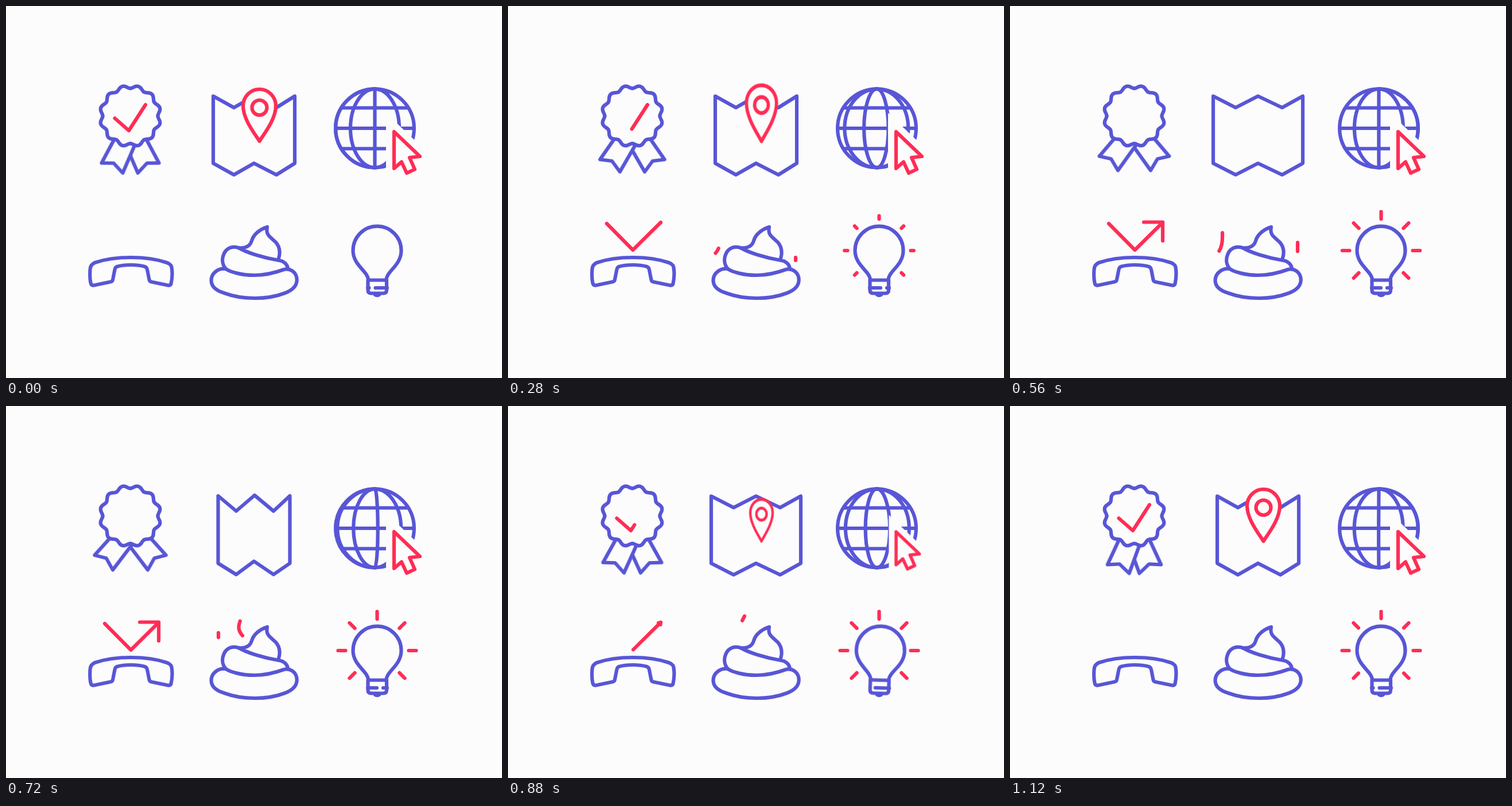
Write an HTML page without scripts that moves like this. It is 864x648 px and loops after 1.16 s.

```html
<!DOCTYPE html>
<html lang="en">
<head>
<meta charset="utf-8">
<title>Icon set</title>
<style>
  :root { --bg: #fcfcfc; --blue: #5856d6; --red: #ff2d55; --loop: 1160ms; }
  html, body { margin: 0; width: 100%; height: 100%; overflow: hidden; background: var(--bg); }
  svg { display: block; width: 100%; height: 100%; }
  svg { fill: none; stroke: var(--blue); stroke-width: 6.2; stroke-linecap: round; stroke-linejoin: round; }
  .red { stroke: var(--red); }
  .solid { fill: var(--bg); }
  .flat { stroke-linecap: butt; }
  .gap { fill: var(--bg); stroke: var(--bg); stroke-width: 28; stroke-linejoin: miter; stroke-miterlimit: 4; }

  /* Trimmed lines: one dash of the full length travels along the path */
  .trim { stroke-dasharray: 100 110; animation: var(--loop) linear infinite; }

  .ribbon { transform-origin: 216.5px 217px; animation: sway var(--loop) ease-in-out infinite; }
  @keyframes sway {
    0%, 96.55%, 100% { transform: rotate(0deg); }
    24.14% { transform: rotate(8deg); animation-timing-function: ease-out; }
    37.93% { transform: rotate(14.5deg); animation-timing-function: ease-in; }
    48.28% { transform: rotate(8deg); animation-timing-function: ease-out; }
    62.07% { transform: rotate(-4.6deg); }
    75.86% { transform: rotate(5.6deg); }
  }

  .check { animation-name: check; }
  @keyframes check {
    0%, 3% { stroke-dashoffset: 0; animation-timing-function: ease-in; }
    24.14% { stroke-dashoffset: -41; animation-timing-function: ease-out; }
    37.93% { stroke-dashoffset: -98.5; }
    39.6%, 64% { stroke-dashoffset: -105; }
    75.86% { stroke-dashoffset: -161; animation-timing-function: ease-out; }
    89.66%, 100% { stroke-dashoffset: -210; }
  }

  .map { animation: fold var(--loop) ease-in-out infinite; }
  @keyframes fold {
    0%, 37.93%, 96.55%, 100% { d: path("M361 157L397 177L432 157L471 177L503 157L503 274L471 294L432 274L397 294L361 274Z"); }
    48.28%, 75.86% { d: path("M354 157L393 177L432 157L474 177L510 157L510 274L474 294L432 274L393 294L354 274Z"); }
    62.07% { d: path("M369.5 156.5L401 183L433 155.5L466 183L494.5 156.5L494.5 274L466 293.5L432 270.5L401 293.5L369.5 274Z"); }
  }

  .pin { transform-origin: 441.5px 235px; animation: pop var(--loop) ease-in-out infinite; }
  @keyframes pop {
    0%, 6.9%, 96.55%, 100% { transform: scale(1, 1); }
    24.14% { transform: scale(.92, 1.078); animation-timing-function: ease-in; }
    35.5%, 62.07% { transform: scale(0, 0); animation-timing-function: ease-in; }
    75.86% { transform: scale(.68, .8); animation-timing-function: ease-out; }
    84.5% { transform: scale(.92, 1.078); }
  }

  /* Four meridians share one path of travel, one slot apart */
  .turn path { animation: turn 2320ms ease-in-out infinite; }
  .turn path:nth-child(2) { animation-delay: -580ms; }
  .turn path:nth-child(3) { animation-delay: -1160ms; }
  .turn path:nth-child(4) { animation-delay: -1740ms; }
  @keyframes turn {
    0% { d: path("M0 -68.4C-37.8 -68.4 -68.4 -37.8 -68.4 0C-68.4 37.8 -37.8 68.4 0 68.4"); }
    25% { d: path("M0 -68.4C-23.4 -68.4 -42.5 -37.8 -42.5 0C-42.5 37.8 -23.4 68.4 0 68.4"); }
    50% { d: path("M0 -68.4C0 -68.4 0 -37.8 0 0C0 37.8 0 68.4 0 68.4"); }
    75% { d: path("M0 -68.4C23.4 -68.4 42.5 -37.8 42.5 0C42.5 37.8 23.4 68.4 0 68.4"); }
    100% { d: path("M0 -68.4C37.8 -68.4 68.4 -37.8 68.4 0C68.4 37.8 37.8 68.4 0 68.4"); }
  }

  .cursor { transform-origin: 676px 219px; animation: click var(--loop) ease-in-out infinite; }
  @keyframes click {
    0%, 66%, 93%, 100% { transform: scale(1); }
    75.86%, 81% { transform: scale(.9); }
  }

  .shaft { animation-name: shaft; }
  @keyframes shaft {
    0% { stroke-dashoffset: 105; }
    3% { stroke-dashoffset: 101; animation-timing-function: ease-in-out; }
    23.5%, 63.8% { stroke-dashoffset: 0; animation-timing-function: ease-in; }
    75.86% { stroke-dashoffset: -48.7; animation-timing-function: ease-out; }
    87.9% { stroke-dashoffset: -101; }
    89%, 100% { stroke-dashoffset: -105; }
  }
  .head { animation: head var(--loop) ease-in-out infinite, blink var(--loop) step-end infinite; }
  @keyframes head {
    0%, 24.14%, 78%, 100% { d: path("M266 377L266 377L266 377"); }
    37.93% { d: path("M235 374L266.5 376L271 407"); }
    48.28%, 62.07% { d: path("M233 376.5L266 376.5L266 409"); }
    75.86% { d: path("M262 378L266 377L265.5 381"); }
  }
  @keyframes blink { 0%, 85% { opacity: 0; } 24.2% { opacity: 1; } }

  .steam1 { animation-name: steam1; }
  @keyframes steam1 {
    0%, 18% { stroke-dashoffset: 105; }
    24.14% { stroke-dashoffset: 74; }
    37.93% { stroke-dashoffset: 22; }
    48.28% { stroke-dashoffset: -12; }
    62.07% { stroke-dashoffset: -78; }
    67%, 100% { stroke-dashoffset: -105; }
  }
  .steam2 { animation-name: steam2; }
  @keyframes steam2 {
    0%, 20.7% { stroke-dashoffset: 105; }
    24.14% { stroke-dashoffset: 85; }
    37.93% { stroke-dashoffset: 10; }
    48.28% { stroke-dashoffset: -50; }
    57%, 100% { stroke-dashoffset: -105; }
  }
  .steam3 { animation-name: steam3; }
  @keyframes steam3 {
    0%, 50% { stroke-dashoffset: 105; }
    62.07% { stroke-dashoffset: 27; }
    75.86% { stroke-dashoffset: -76; }
    80%, 100% { stroke-dashoffset: -105; }
  }

  .bulb { transform-origin: 647px 500px; animation: wobble var(--loop) ease-in-out infinite; }
  @keyframes wobble {
    0%, 67%, 96.55%, 100% { transform: rotate(0deg); }
    75.86% { transform: rotate(1.8deg); }
    84.5% { transform: rotate(-1.2deg); }
  }
  .thread { stroke-dasharray: 40 11; animation: screw var(--loop) ease-in-out infinite; }
  @keyframes screw {
    0%, 96.55%, 100% { stroke-dashoffset: 37.5; }
    24.14% { stroke-dashoffset: 21; }
    37.93% { stroke-dashoffset: 22.5; }
    48.28%, 62.07% { stroke-dashoffset: 24; }
    75.86% { stroke-dashoffset: 41.5; }
  }
  .ray { animation-name: ray; }
  @keyframes ray {
    0%, 12% { stroke-dashoffset: 105; }
    24.14% { stroke-dashoffset: 22; animation-timing-function: ease-out; }
    34.5%, 63.8% { stroke-dashoffset: 0; animation-timing-function: ease-in-out; }
    75.86% { stroke-dashoffset: -98; }
    77.6%, 100% { stroke-dashoffset: -105; }
  }
</style>
</head>
<body>
<svg viewBox="0 0 864 648" xmlns="http://www.w3.org/2000/svg">
  <defs>
    <path id="bump" d="M-12.42 -46.36C-7.4 -47.7 -6.4 -53.4 0 -53.4S7.4 -47.7 12.42 -46.36"/>
    <path id="ribbon" class="ribbon solid" d="M190 230L167 274L188 274L204 291L228 234"/>
    <path id="ray" class="ray trim red" pathLength="100" d="M0 -55V-68"/>
    <path id="arrow" d="M676 219V283L689 271.5L698 291L712 284.5L703 264L721 262Z"/>
  </defs>

  <!-- Award -->
  <g transform="translate(433 0) scale(-1 1)"><use href="#ribbon"/></g>
  <use href="#ribbon"/>
  <g class="solid" transform="translate(216.5 191.5)">
    <circle r="48" stroke="none"/>
    <use href="#bump" transform="rotate(15)"/>
    <use href="#bump" transform="rotate(45)"/>
    <use href="#bump" transform="rotate(75)"/>
    <use href="#bump" transform="rotate(105)"/>
    <use href="#bump" transform="rotate(135)"/>
    <use href="#bump" transform="rotate(165)"/>
    <use href="#bump" transform="rotate(195)"/>
    <use href="#bump" transform="rotate(225)"/>
    <use href="#bump" transform="rotate(255)"/>
    <use href="#bump" transform="rotate(285)"/>
    <use href="#bump" transform="rotate(315)"/>
    <use href="#bump" transform="rotate(345)"/>
  </g>
  <path class="check trim red" pathLength="100" d="M189.5 195.5L214 217L243 172"/>

  <!-- Map -->
  <path class="map" d="M361 157L397 177L432 157L471 177L503 157L503 274L471 294L432 274L397 294L361 274Z"/>
  <g class="pin red solid">
    <path d="M441.5 235.5C433 222 413 197 413 174A28.5 29 0 0 1 470 174C470 197 450 222 441.5 235.5Z"/>
    <circle cx="441.5" cy="177" r="13"/>
  </g>

  <!-- Globe -->
  <g transform="translate(642.5 213)">
    <path class="flat" d="M-58.5 -35.5H58.5M-68.4 0H68.4M-58.5 35.5H58.5"/>
    <g class="turn"><path/><path/><path/><path/></g>
    <circle r="68.4"/>
  </g>
  <g class="cursor">
    <use href="#arrow" class="gap"/>
    <use href="#arrow" class="red"/>
  </g>

  <!-- Phone -->
  <path d="M146.5 459C147 452 150 449 155 447C190 435 245 435 280 447C286 449 289 452 289 459C290 467 289 477 287.500 484C286.500 486 285 487 282 486.500L253 480.500C251 480 250 479 249.500 477L246 459C245.500 456 244 455 242 454C228 450 207 450 193 454C191 455 190 456 189.500 459L186 477C185.500 479 184 480 182 480.500L153.500 486.500C150.500 487 149 486 148 484C146 477 146 467 146.500 459Z"/>
  <path class="shaft trim red" pathLength="100" d="M172 379L217.500 425L266 377"/>
  <path class="head red" d="M266 377L266 377L266 377"/>

  <!-- Swirl -->
  <path d="M383 458C369 456 357.500 466 357.500 478C357.500 489 367 496 380 500C412 512 455 512 486 500C499 495 506.700 488 506.700 477C506.700 464 495 456 484 459C476 462 456 469 432 469C410 469 390 463 383 458"/>
  <path d="M383 458C376 450 376 440 379.500 432C384 421 395 417.500 406 421.500C418 429 446 438 475 443C484 444 490 450 491 457"/>
  <path d="M406 421.500C420 422 426 416 428 409C431 398 442 389 455 385C452 398 460 402 466 408C477 416 479 430 474 442"/>
  <path class="steam1 trim red" pathLength="100" d="M361.500 430.500C368 423 370 414 370 403V395"/>
  <path class="steam2 trim red" pathLength="100" d="M501 443V412"/>
  <path class="steam3 trim red" pathLength="100" d="M412 400C403 390 405 382 408 374L412 366"/>

  <!-- Bulb -->
  <g class="bulb">
    <path d="M631 477.500C631 462 604.500 452 604.500 426A42 42.500 0 0 1 688.500 426C688.500 452 662.500 462 662.500 477.500"/>
    <path d="M630.500 477.500H663V495Q663 500.500 657.500 500.500H636Q630.500 500.500 630.500 495Z"/>
    <path d="M643 503Q646.500 505 650 503"/>
    <path class="thread" d="M630 491H664"/>
  </g>
  <g transform="translate(646.500 426)">
    <use href="#ray"/>
    <use href="#ray" transform="rotate(45)"/>
    <use href="#ray" transform="rotate(90)"/>
    <use href="#ray" transform="rotate(135)"/>
    <use href="#ray" transform="rotate(-45)"/>
    <use href="#ray" transform="rotate(-90)"/>
    <use href="#ray" transform="rotate(-135)"/>
  </g>
</svg>
</body>
</html>
```
